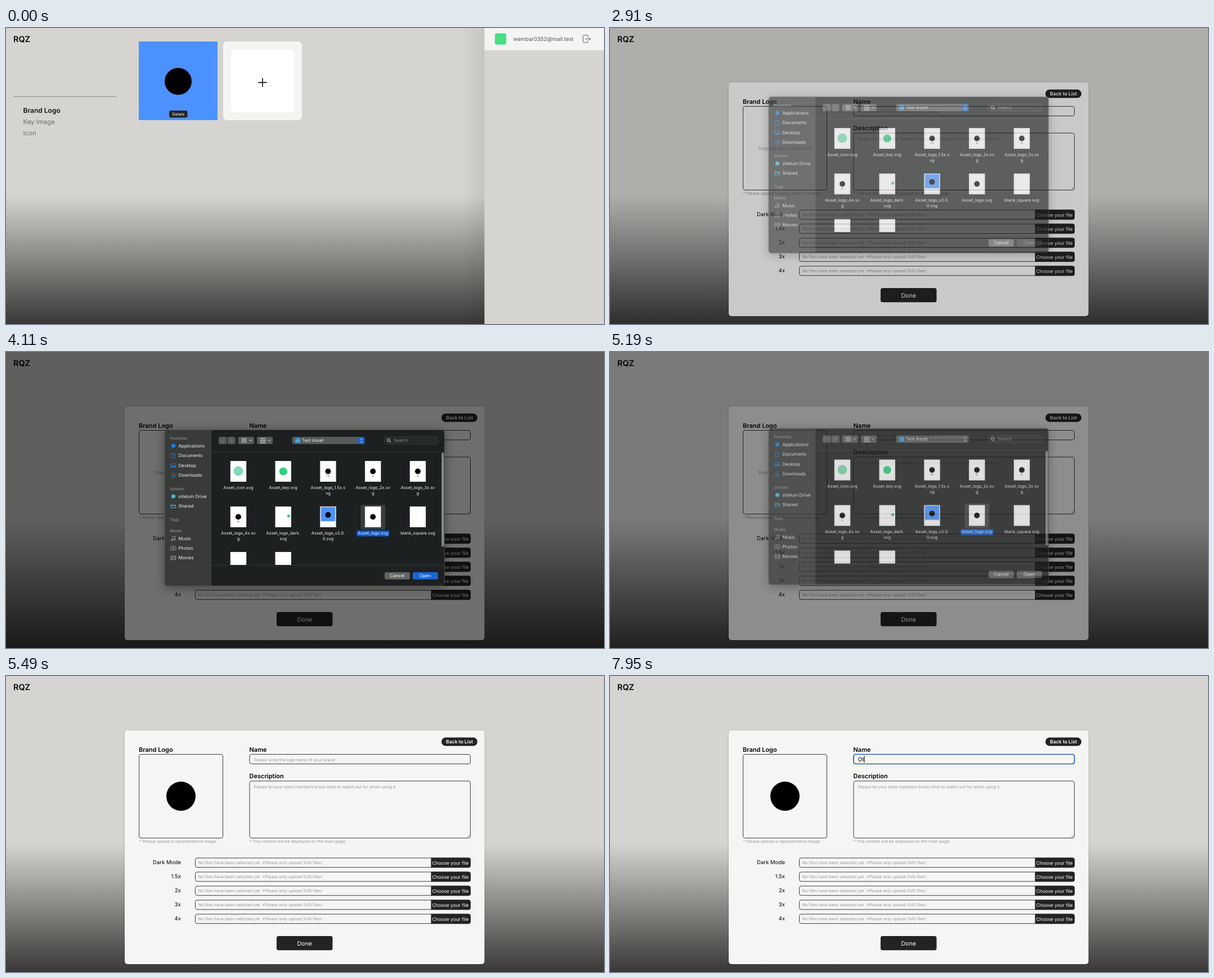
Write an HTML page that moves like this. It is 1063 px wide and 527 px high and loops after 8 s.

```html
<!DOCTYPE html>
<html lang="en">
<head>
<meta charset="utf-8">
<title>Brand asset upload</title>
<style>
  html, body { margin: 0; width: 100%; height: 100%; overflow: hidden; background: #d5d4d1; }
  svg { display: block; width: 100vw; height: 100vh; }
  text { font-family: Inter, sans-serif; white-space: pre; text-rendering: geometricPrecision; }
  .b { font-weight: 600; }
  .m { text-anchor: middle; }
  .e { text-anchor: end; }

  .step { animation: 8s step-end infinite; }
  .list { animation-name: list; }
  .form { animation-name: form; }
  .drop { animation-name: drop; }
  .uploaded { animation-name: uploaded; }
  .picked { animation-name: picked; }
  .active { animation-name: active; }
  .ready { animation-name: ready; }
  .idle { animation-name: idle; }
  .focus { animation-name: focus; }
  .hint { animation-name: hint; }
  .key1 { animation-name: key1; }
  .key2 { animation-name: key2; }
  .caret { animation-name: caret; }
  .shade { animation: shade 8s linear infinite; }
  .dialog { animation: dialog 8s linear infinite; }
  .bar { animation: bar 8s linear infinite; }
  .window { filter: drop-shadow(0 3px 9px rgba(0, 0, 0, .4)); }

  @keyframes list { 0% { opacity: 1 } 19.5%, 100% { opacity: 0 } }
  @keyframes form { 0% { opacity: 0 } 19.5%, 100% { opacity: 1 } }
  @keyframes drop { 0% { opacity: 1 } 67.875%, 100% { opacity: 0 } }
  @keyframes uploaded { 0% { opacity: 0 } 67.875%, 100% { opacity: 1 } }
  @keyframes picked { 0% { opacity: 0 } 50.25%, 100% { opacity: 1 } }
  @keyframes active { 0% { opacity: 1 } 63.375%, 100% { opacity: 0 } }
  @keyframes ready { 0% { opacity: 0 } 50.25% { opacity: 1 } 63.375%, 100% { opacity: 0 } }
  @keyframes idle { 0% { opacity: 0 } 63.375%, 100% { opacity: 1 } }
  @keyframes focus { 0% { opacity: 0 } 78.375%, 100% { opacity: 1 } }
  @keyframes hint { 0% { opacity: 1 } 96%, 100% { opacity: 0 } }
  @keyframes key1 { 0% { opacity: 0 } 96%, 100% { opacity: 1 } }
  @keyframes key2 { 0% { opacity: 0 } 99.375%, 100% { opacity: 1 } }
  @keyframes caret {
    0% { opacity: 0; transform: none }
    78.375% { opacity: 1; transform: none }
    84% { opacity: 0; transform: none }
    89.625% { opacity: 1; transform: none }
    95.25% { opacity: 0; transform: none }
    96% { opacity: 1; transform: translateX(7.7px) }
    99.375%, 100% { opacity: 1; transform: translateX(11px) }
  }
  @keyframes shade {
    0%, 36.37% { opacity: 0 }
    36.375% { opacity: .18; animation-timing-function: ease-out }
    40.5%, 63.5% { opacity: .55 }
    64.875% { opacity: .43 }
    68.5%, 100% { opacity: 0 }
  }
  @keyframes dialog {
    0%, 36.37% { opacity: 0; transform: translateY(-16px) }
    36.375% { opacity: .62; transform: translateY(-16px); animation-timing-function: ease-out }
    39.5%, 63.75% { opacity: 1; transform: none }
    64.875% { opacity: .73; transform: translateY(-2.4px) }
    67.5%, 100% { opacity: 0; transform: translateY(-16px) }
  }
  @keyframes bar { 0%, 37.5% { opacity: 0 } 39.5%, 100% { opacity: 1 } }
</style>
</head>
<body>
<svg id="stage" viewBox="0 0 1063 527" preserveAspectRatio="none"></svg>
<script>
const INK = '#232321', GREY = '#999997', BLUE = '#4b92ff', GREEN = '#2fd07f';

const rect = (x, y, w, h, fill, r = 0, extra = '') =>
  `<rect x="${x}" y="${y}" width="${w}" height="${h}" rx="${r}" fill="${fill}" ${extra}/>`;
const frame = (x, y, w, h, stroke = '#3c3c3a', width = 1, r = 3.5) =>
  rect(x, y, w, h, 'none', r, `stroke="${stroke}" stroke-width="${width}"`);
const text = (x, y, size, str, fill = '#000', cls = '') =>
  `<text x="${x}" y="${y}" font-size="${size}" fill="${fill}" class="${cls}">${str}</text>`;
const line = (d, stroke, width = 1) =>
  `<path d="${d}" fill="none" stroke="${stroke}" stroke-width="${width}" stroke-linecap="round" stroke-linejoin="round"/>`;
const dot = (x, y, r, fill) => `<circle cx="${x}" cy="${y}" r="${r}" fill="${fill}"/>`;
const group = (cls, ...parts) => `<g class="${cls}">${parts.join('')}</g>`;

const defs = `<defs>
  <linearGradient id="dusk" x2="0" y2="1">
    <stop offset=".565" stop-color="#d5d4d1"/><stop offset="1" stop-color="#393836"/>
  </linearGradient>
  <linearGradient id="edge"><stop stop-opacity="0"/><stop offset="1" stop-opacity=".07"/></linearGradient>
  <clipPath id="files"><path d="M366 178H779V379H366z"/></clipPath>
  <clipPath id="pane"><rect x="282" y="138.5" width="497.5" height="278" rx="5"/></clipPath>
</defs>`;

function listPage() {
  return group('step list',
    rect(13, 121.5, 183, 1.2, '#92918f'),
    text(30.5, 151, 12, 'Brand Logo', '#111', 'b'),
    text(30.5, 171, 11.4, 'Key Image', '#6d6c6a'),
    text(30.5, 191, 11.4, 'Icon', '#6d6c6a'),
    rect(236, 24, 140, 140, BLUE),
    dot(306, 95, 24, '#000'),
    rect(290, 147, 32.5, 12.5, INK, 3),
    text(306.2, 155.8, 7.2, 'Delete', '#fff', 'm'),
    rect(386, 24, 140, 140, '#f4f4f2', 7),
    rect(400, 38, 112, 112.5, '#fff', 7),
    rect(448.3, 96, 15.4, 2, '#333'),
    rect(455, 89.3, 2, 15.4, '#333'),
    rect(812, 0, 38.5, 527, 'url(#edge)'),
    rect(850.5, 0, 212.5, 527, '#d5d4d1'),
    rect(850.5, 0, 212.5, 39.5, '#f4f4f2'),
    rect(869, 9.5, 20.2, 20, '#47e083', 3),
    text(901.5, 23, 9.6, 'wembar0352@mail.test', '#555'),
    line('M1034.5 16V14.5Q1034.5 12.8 1032.8 12.8H1027.5Q1025.8 12.8 1025.8 14.5V24.3Q1025.8 26 1027.5 26H1032.8Q1034.5 26 1034.5 24.3V22.8M1030 19.4H1038.8M1036.2 16.8L1038.8 19.4L1036.2 22', '#555'));
}

function fileRow(label, i) {
  const y = 324 + i * 25;
  return text(311, y + 11, 9.6, label, '#000', 'e') +
    frame(336.5, y, 489, 16.7) +
    text(341.5, y + 11.1, 7.4, 'No files have been selected yet. *Please only upload SVG files!', GREY) +
    `<path d="M755.5 ${y - .5}h66.5a4 4 0 0 1 4 4v9.7a4 4 0 0 1-4 4h-66.5z" fill="${INK}"/>` +
    text(790, y + 11.5, 8.4, 'Choose your file', '#fff', 'm');
}

function formPage() {
  return group('step form',
    rect(211, 97, 639.5, 416, '#f5f5f3', 5, 'style="filter:drop-shadow(0 1px 2px rgba(0,0,0,.15))"'),
    rect(774, 109.5, 64, 15, INK, 7.5),
    text(806, 120.1, 8.6, 'Back to List', '#fff', 'b m'),
    text(236, 134.5, 11, 'Brand Logo', '#000', 'b'),
    frame(236.5, 139.5, 149, 149),
    text(311, 217, 7.4, 'Drag and drop or click here', GREY, 'm step drop'),
    group('step uploaded', dot(311, 214, 26, '#000')),
    text(236.5, 296.7, 7.4, '* Please upload a representative image.', GREY),
    text(432.5, 134.5, 11, 'Name', '#000', 'b'),
    frame(433, 139.5, 392.5, 17),
    group('step focus', frame(433, 139.5, 392.5, 17, '#2465b5', 1.7)),
    text(440.8, 151.6, 7.4, 'Please write the logo name of your brand', GREY, 'step hint'),
    text(440.8, 152, 10, 'O', '#000', 'step key1'),
    text(448.4, 152, 10, 't', '#000', 'step key2'),
    rect(440.6, 142, 1, 12, '#000', 0, 'class="step caret"'),
    text(432.5, 181.7, 11, 'Description', '#000', 'b'),
    frame(433, 187, 392.5, 101.5),
    line('M820 287L824.3 282.7M822.7 287L824.3 285.4', '#666', .7),
    text(440.8, 200, 7.4, 'Please let your team members know what to watch out for when using it.', GREY),
    text(432.5, 296.7, 7.4, '* The content will be displayed on the main page.', GREY),
    ['Dark Mode', '1.5x', '2x', '3x', '4x'].map(fileRow).join(''),
    rect(481, 463, 99.5, 25.2, INK, 3.5),
    text(530.7, 479.6, 10.6, 'Done', '#fff', 'm'));
}

// Sidebar icons are drawn around 0,0.
const sky = '#1c80e0', cyan = '#49b6d8', ash = '#a5a7a6';
const folder = line('M-4 -3H-1L0 -2H4V3H-4zM-4 -.8H4', cyan, .9);
const icons = {
  Applications: dot(0, 0, 3.6, sky),
  Documents: line('M-3 -4H.6L3 -1.6V4H-3zM.6 -4V-1.6H3', sky, .9),
  Desktop: line('M-4.2 -3H4.2V3H-4.2z', sky, .9) + rect(-4, .6, 8, 2, sky),
  Downloads: line('M-4 0A4 4 0 1 1 4 0A4 4 0 1 1 -4 0M0 -2V2M-1.6 .6L0 2L1.6 .6', sky, .9),
  'oVelum Drive': dot(0, 0, 3.6, cyan),
  Shared: folder,
  Music: line('M-1.6 2.8V-3L3 -4V1.8', ash, .9) + dot(-2.7, 2.9, 1.4, ash) + dot(1.9, 1.9, 1.4, ash),
  Photos: line('M-4.4 -2.4H-2L-1.2 -3.6H1.2L2 -2.4H4.4V3.4H-4.4zM-1.7 .4A1.7 1.7 0 1 1 1.7 .4A1.7 1.7 0 1 1 -1.7 .4', ash, .8),
  Movies: line('M-4.2 -3.3H4.2V3.3H-4.2zM-2.4 -3.3V3.3M2.4 -3.3V3.3M-2.4 0H2.4', ash, .8)
};

function sidebar() {
  const heads = { Favorites: 153, oVelum: 243, Tags: 298, Media: 318 };
  const rows = [167, 184.5, 202, 219.5, 257, 274.5, 332, 349, 366.5];
  return Object.entries(heads).map(([s, y]) => text(291.5, y + 2.6, 7, s, '#858786', 'b')).join('') +
    Object.entries(icons).map(([s, icon], i) =>
      `<g transform="translate(297.5 ${rows[i]})">${icon}</g>` +
      text(306.5, rows[i] + 2.9, 8, s, '#f2f2f2')).join('');
}

function toolbar() {
  const button = (x, w) => rect(x, 151, w, 13, '#575a59', 3);
  let grid = '';
  for (const x of [419.5, 424]) for (const y of [153.8, 158.3])
    grid += frame(x, y, 3, 3, '#e0e0e0', .8, .6);
  for (const y of [153.5, 157, 160.5]) for (const x of [452, 455.3, 458.6])
    grid += rect(x, y, 2.6, 2, '#c8c8c8');
  return button(378, 14.5) + button(393.7, 14) + button(412.5, 28.5) + button(446, 28.3) + grid +
    line('M386.5 155L384 157.5L386.5 160M399.5 155L402 157.5L399.5 160', '#8b8d8c') +
    line('M432.5 156.5L434.7 158.7L436.9 156.5M465.5 156.5L467.7 158.7L469.9 156.5', '#eee') +
    button(508.5, 129) + rect(514, 153.6, 9, 7.8, '#3fa5e8', 1) + rect(514, 155.3, 9, .7, '#2479b8') +
    text(526, 160.3, 7.8, 'Test Asset', '#f2f2f2') +
    group('step active', rect(626, 151.5, 11, 12, '#1b63cf', 2.5)) +
    line('M629.4 156L631.4 154L633.4 156M629.4 159L631.4 161L633.4 159', '#fff', .9) +
    rect(672.5, 151, 95, 13, '#252929', 3, 'stroke="#3c4040" stroke-width=".8"') +
    line('M677.4 157A2.6 2.6 0 1 1 682.6 157A2.6 2.6 0 1 1 677.4 157M682 159L684 161', '#ddd', .9) +
    text(689, 160.3, 7.8, 'Search', '#8a8c8b');
}

const files = [
  ['Asset_icon.svg', '', 'icon'], ['Asset_key.svg', '', 'key'],
  ['Asset_logo_1.5x.s', 'vg', 'logo', '1.5x'], ['Asset_logo_2x.sv', 'g', 'logo', '2x'],
  ['Asset_logo_3x.sv', 'g', 'logo', '3x'], ['Asset_logo_4x.sv', 'g', 'logo', '4x'],
  ['Asset_logo_dark.', 'svg', 'dark'], ['Asset_logo_v2.0.', '0.svg', 'blue'],
  ['Asset_logo.svg', '', 'logo', ''], ['blank_square.svg', '', 'blank'],
  ['', '', 'blank'], ['', '', 'blank']
];
const marks = {
  icon: x => dot(x, 18, 8.5, '#7fdcb4'),
  key: x => dot(x, 18.5, 7, GREEN),
  logo: (x, size) => dot(x, 18.5, 5, '#000') + text(x, 28, 3.6, size, '#222', 'm'),
  dark: x => dot(x + 9.7, 17, 2.6, GREEN),
  blue: x => rect(x - 12.8, 1, 25.6, 25.3, BLUE) + dot(x, 15, 5, '#000'),
  blank: () => ''
};

function file([name, rest, kind, size], i) {
  const x = 413 + (i % 5) * 79.75, y = 194 + Math.floor(i / 5) * 81;
  const chosen = name === 'Asset_logo.svg'
    ? group('step picked', rect(x - 22, -3, 44, 44, '#393d3d', 3), rect(x - 29, 42.8, 58, 10.4, '#0b5ad3', 2))
    : '';
  return `<g transform="translate(0 ${y})">${chosen}` +
    rect(x - 14.2, 0, 28.4, 37, '#fff') + frame(x - 12.6, 1.6, 25.2, 33.8, '#e4e4e2', .5, 0) +
    marks[kind](x, size) +
    text(x, 50.2, 7.5, name, '#f2f2f2', 'm') + text(x, 60, 7.5, rest, '#f2f2f2', 'm') + '</g>';
}

function dialog() {
  const open = fill => rect(723, 392, 45, 13, fill, 3) + text(745.3, 401.3, 8, 'Open', '#fff', 'm');
  return group('dialog',
    rect(282, 138.5, 497.5, 278, '#1c2020', 5, 'class="window"'),
    `<g clip-path="url(#pane)">${rect(282, 138, 84, 279, '#393b3b')}${rect(365.5, 138, .8, 279, '#151717')}</g>`,
    rect(366, 177, 413.5, .8, '#3a3e3e'), rect(366, 379, 413.5, .8, '#3a3e3e'),
    sidebar(), toolbar(),
    `<g clip-path="url(#files)">${files.map(file).join('')}</g>`,
    group('bar', rect(774.3, 179, 4.2, 167.5, '#8a8c8b', 2.1)),
    rect(673, 392, 45, 13, '#616463', 3),
    text(695.4, 401.3, 8, 'Cancel', '#fff', 'm'),
    rect(723, 392, 45, 13, '#363a3a', 3),
    text(745.3, 401.3, 8, 'Open', '#858786', 'm'),
    group('step ready', open('#1966d2')),
    group('step idle', open('#616463')),
    frame(282, 138.5, 497.5, 278, '#555857', .8, 5));
}

document.getElementById('stage').innerHTML = defs +
  rect(0, 0, 1063, 527, 'url(#dusk)') +
  listPage() + formPage() +
  rect(0, 0, 1063, 527, '#000', 0, 'class="shade"') +
  text(13, 25, 14.4, 'RQZ', '#000', 'b') +
  dialog();
</script>
</body>
</html>
```
